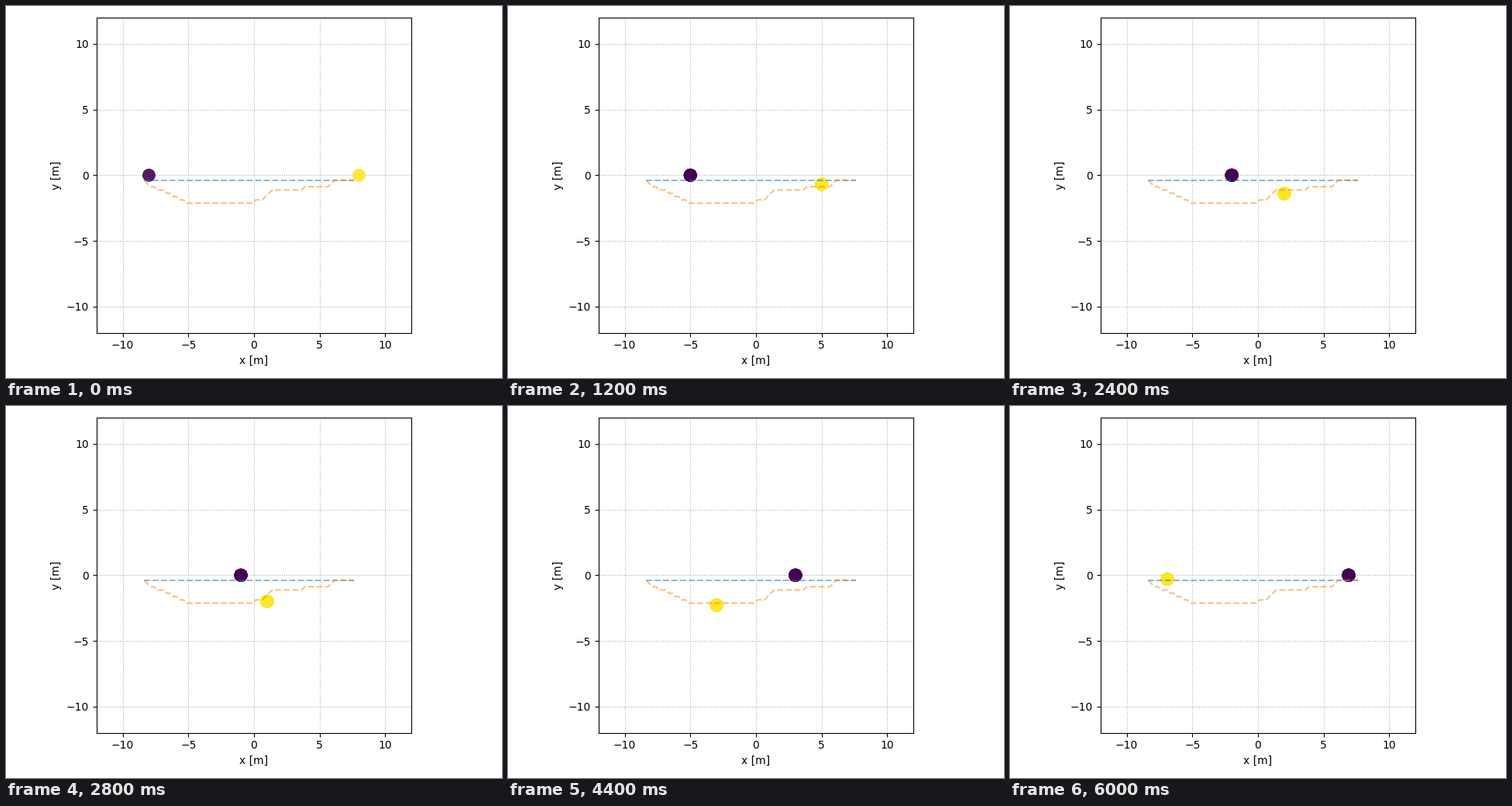
Animation of 640 by 480 pixels, one loop 6200 ms. Source, as a matplotlib script:

```python
import numpy as np
import matplotlib.pyplot as plt
from matplotlib.animation import FuncAnimation
from matplotlib.patches import Circle

FRAMES, STEP_MS = 31, 200
CELL = 0.25
START = 8
SPEED = 0.5
TRAVEL = 14.9
PURPLE, YELLOW = "#440154", "#fde725"


def walk(x, y, runs):
    """Go left over grid cells: each run is a flat part, then a diagonal."""
    points = [(x, y)]
    for flat, rise in runs:
        x -= flat * CELL
        points.append((x, y))
        x -= abs(rise) * CELL
        y += rise * CELL
        points.append((x, y))
    return np.array(points)


def smooth(t, start, end):
    u = np.clip((t - start) / (end - start), 0, 1)
    return u * u * (3 - 2 * u)


def drift(i):
    """Sideways position of the yellow robot: two swerves, then a return."""
    out = 0.77 * smooth(i, 2, 7) + 1.51 * smooth(i, 8.8, 16)
    return 0.32 * max(0, i - 23.8) - out


fig, ax = plt.subplots(figsize=(6.4, 4.8), dpi=100)
ax.set_aspect("equal")
ax.set(xlim=(-12, 12), ylim=(-12, 12), xlabel="x [m]", ylabel="y [m]")
ticks = range(-10, 11, 5)
ax.set_xticks(ticks)
ax.set_yticks(ticks)
ax.set_axisbelow(True)
ax.grid(linestyle=":")

# Planned routes
ax.plot([-8.375, 7.625], [-0.375, -0.375], "--", alpha=0.5)
swerve = [(6, -2), (7, -1), (9, -3), (2, -1), (20, 1)]
stairs = [(1, 1)] * 3 + [(2, 1), (1, 2)]
ax.plot(*walk(7.625, -0.375, swerve + stairs).T, "--", alpha=0.5)


def add_robot(color):
    """Stack of translucent discs; one more is shown at every step."""
    return [ax.add_patch(Circle((0, 0), 0.5, facecolor=color, linewidth=0,
                                alpha=0.9, zorder=1))
            for _ in range(FRAMES)]


purple, yellow = add_robot(PURPLE), add_robot(YELLOW)
fig.tight_layout()


def place(robot, center, layers):
    for j, disc in enumerate(robot):
        disc.center = center
        disc.set_visible(j < layers)


def update(i):
    x = min(SPEED * i, TRAVEL) - START
    place(purple, (x, 0), i + 1)
    place(yellow, (-x, drift(i)), i + 1)
    return purple + yellow


anim = FuncAnimation(fig, update, frames=FRAMES, interval=STEP_MS,
                     repeat=True, repeat_delay=0, blit=False)
plt.show()
```
